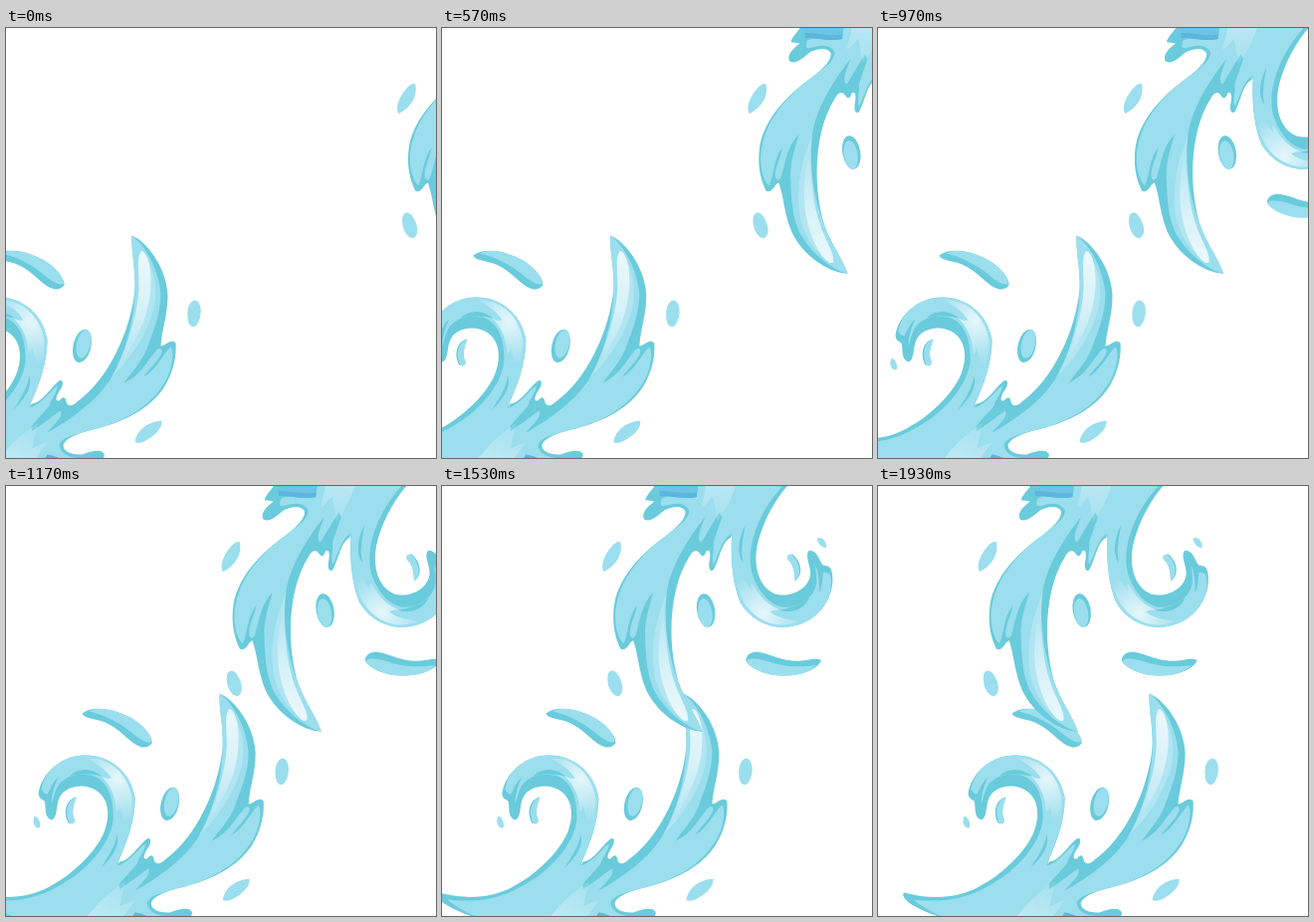
Write an HTML page that moves like this. It is 432 px wide and 432 px high and loops after 1960 ms.

```html
<!DOCTYPE html>
<html lang="en">
<head>
<meta charset="utf-8">
<title>Water splashes</title>
<style>
  html, body { margin: 0; width: 100%; height: 100%; overflow: hidden; background: #fff; }
  svg { display: block; width: 100vw; height: 100vh; }
  .teal { fill: #69cbdb; }
  .light { fill: #9bdeee; }
</style>
</head>
<body>
<svg viewBox="0 0 432 432">
  <defs>
    <linearGradient id="spikeShine" gradientUnits="userSpaceOnUse" x1="270" y1="225" x2="252" y2="330">
      <stop offset="0" stop-color="#fff" stop-opacity=".75"/>
      <stop offset=".5" stop-color="#fff" stop-opacity=".5"/>
      <stop offset="1" stop-color="#fff" stop-opacity=".08"/>
    </linearGradient>
    <radialGradient id="curlShine" gradientUnits="userSpaceOnUse" cx="155" cy="294" r="44">
      <stop offset="0" stop-color="#fff" stop-opacity=".75"/>
      <stop offset="1" stop-color="#fff" stop-opacity="0"/>
    </radialGradient>
    <linearGradient id="bodyShine" gradientUnits="userSpaceOnUse" x1="165" y1="392" x2="140" y2="440">
      <stop offset="0" stop-color="#fff" stop-opacity=".08"/>
      <stop offset="1" stop-color="#fff" stop-opacity=".35"/>
    </linearGradient>

    <g id="splash">
      <!-- shaded silhouette -->
      <g class="teal">
        <path d="M257 208C275 216 292 243 293 268C293 288 287 303 286 319C291 319 296 311 301 316C302 329 299 345 289 361C275 382 249 395 222 402C205 406 190 411 188 419C189 427 199 428 207 428C215 425 225 422 229 427C231 433 222 438 213 440C216 443 222 443 220 446C214 451 209 452 205 456L120 470L94 440L150 400L156 377C166 377 174 362 184 354C189 352 188 359 185 363C181 369 179 375 184 374C187 370 190 369 191 375C192 380 197 380 202 375C233 353 256 304 260 262C261 240 256 225 257 208Z"/>
        <path d="M155 377C164 358 172 335 172 313C168 288 148 270 122 270C98 270 78 288 75 308C75 313 78 314 81 316C83 322 80 332 88 335C95 333 92 318 97 311C104 300 122 298 134 306C146 315 147 331 141 347C133 367 109 390 86 402C66 413 40 416 11 408C7 409 12 417 20 421C34 429 50 434 70 440L160 440Z"/>
      </g>
      <!-- lit surfaces -->
      <g class="light">
        <path d="M154 379C164 357 172 335 172 313C168 288 148 270 122 270C98 270 81 286 78 304C80 308 82 309 84 309C87 303 90 296 95 292C91 301 88 308 88 319C91 311 92 301 99 296C106 290 114 288 128 290C145 295 151 314 150 335C147 360 123 387 94 402C70 416 45 418 20 415C30 424 50 434 70 440L160 440Z"/>
        <path d="M257 208C271 218 284 243 286 266C286 288 278 305 272 322C266 336 258 344 249 356C264 350 272 335 281 324C285 319 289 322 286 328C282 336 275 341 269 350C282 343 288 327 296 320C300 325 298 345 287 360C273 381 249 394 222 402C203 407 186 410 184 419C186 429 196 431 206 432C210 434 208 436 205 440C190 440 175 430 165 450L90 450L100 408C125 396 142 388 154 381C166 378 173 366 182 359C183 364 176 372 174 379C166 389 158 396 148 410C166 399 175 391 185 384C189 389 181 396 172 406C194 394 221 375 235 353C250 330 260 290 260 262C261 240 256 226 257 208Z"/>
      </g>
      <g class="teal">
        <path d="M138 383C145 371 152 362 154 349C157 360 150 372 138 383Z"/>
        <path d="M106 291C116 282 129 283 139 291C129 289 119 288 106 291Z"/>
      </g>
      <path fill="#6cc5e4" d="M206 443C194 438 182 429 172 428C168 434 165 440 162 446L201 458Z"/>
      <path fill="#5cb6dd" d="M206 443C194 438 182 429 172 428L170 432C182 435 193 443 204 448Z"/>
      <!-- highlights -->
      <path fill="#fff" fill-opacity=".22" d="M268 226C280 240 283 262 279 281C272 308 257 330 236 351C250 326 262 290 264 262C264 246 262 232 268 226Z"/>
      <path fill="url(#spikeShine)" d="M266 224C272 222 277 240 276 258C275 285 264 310 248 332C255 308 263 285 264 262C265 246 261 232 266 224Z"/>
      <path fill="url(#curlShine)" d="M124 273C148 272 167 292 169 315C169 331 166 343 161 352C161 338 159 328 156 319C157 325 155 328 153 325C152 308 145 298 138 291C142 293 146 294 148 293C143 284 134 279 124 273Z"/>
      <path fill="url(#bodyShine)" d="M163 396C152 403 138 414 124 432L119 446L154 446C157 434 166 425 172 416C166 417 161 420 157 422C158 412 161 404 163 396Z"/>
      <!-- loose drops -->
      <path class="teal" d="M119 228C131 219 152 224 169 233C182 241 190 252 189 258C185 263 180 263 174 260C166 256 159 246 146 239C136 233 121 234 119 228Z"/>
      <path class="light" d="M126 226C138 220 154 225 169 233C182 241 190 252 188 257C180 258 171 249 163 243C152 235 139 229 126 226Z"/>
      <ellipse class="teal" cx="207" cy="319" rx="9" ry="17" transform="rotate(13 207 319)"/>
      <ellipse class="light" cx="208.5" cy="317" rx="7" ry="14.5" transform="rotate(13 208.5 317)"/>
      <path class="light" d="M321 273C328 276 328 290 322 298C318 302 313 298 313 290C312 282 315 273 321 273Z"/>
      <path class="light" d="M260 415C262 404 272 395 287 394C288 402 279 410 271 414C266 417 261 417 260 415Z"/>
      <path class="teal" d="M113 312C103 314 99 327 105 338C109 340 112 338 111 334C108 328 110 320 113 312Z"/>
      <path class="light" d="M113 312C104 315 101 327 106 338C109 340 112 338 111 334C108 328 110 320 113 312Z"/>
      <path class="light" d="M71 331C75 332 78 339 76 343C71 344 68 337 71 331Z"/>
    </g>
  </defs>
  <use id="lower" href="#splash"/>
  <use id="upper" href="#splash"/>
</svg>
<script>
  const LOOP = 1960;
  const STEP = 2.52;          // pixels the lower splash drifts per step
  const MEETING_STEP = 51.8;  // step at which the drawing sits at its own coordinates
  const lower = document.getElementById('lower');
  const upper = document.getElementById('upper');

  function draw(time) {
    // thirty steps a second, on a 10 ms clock
    const step = Math.floor((time % LOOP + 5) * 0.03);
    const drift = STEP * (step - MEETING_STEP);
    lower.setAttribute('transform', `translate(${drift} 0.4)`);
    upper.setAttribute('transform',
      `translate(${232.2 - 2 * drift} 246.7) rotate(157.5) translate(-257 -208)`);
  }

  const start = performance.now();
  function tick() {
    draw(performance.now() - start);
    requestAnimationFrame(tick);
  }
  tick();
</script>
</body>
</html>
```
